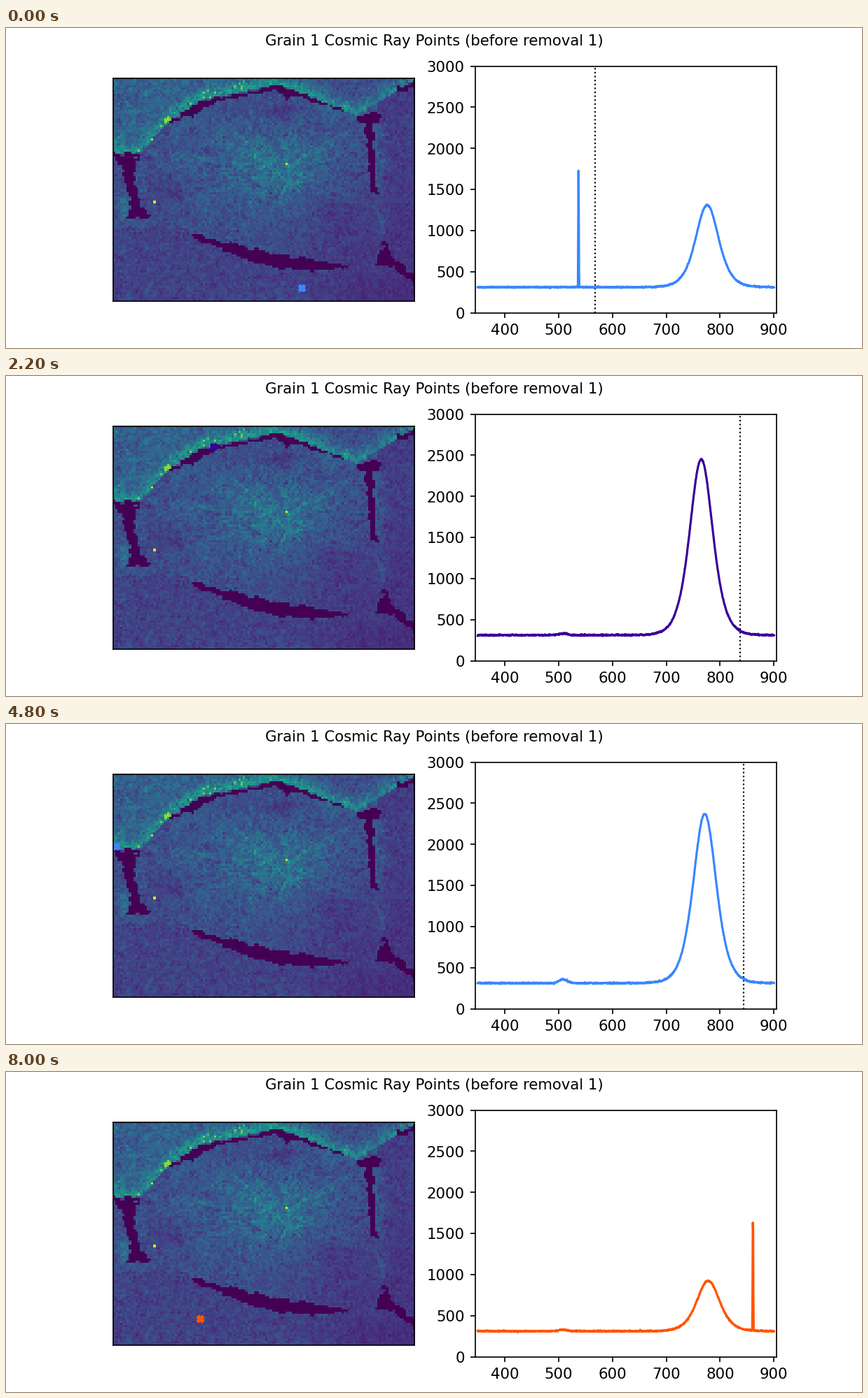
These frames come from a looping animation (1222 by 458 pixels, 8.2 s). A matplotlib script:

```python
import numpy as np
import matplotlib.pyplot as plt
from matplotlib.animation import FuncAnimation

FRAMES, INTERVAL = 41, 200
COLORS = ["#3a86ff", "#ffbe0b", "#ff006e", "#8338ec", "#ff5400", "#390099"]

# map grid, placed in stage pixels
COLS, ROWS = 135, 100
CELL = 430.6 / COLS
LEFT, TOP = 152.8, 71.6
RIGHT, BOTTOM = LEFT + CELL * COLS, TOP + CELL * ROWS

rng = np.random.default_rng(7)


# ---- grain map ----
def sigmoid(v):
    return 1 / (1 + np.exp(-v))


def bump(v, center, width):
    return np.exp(-((v - center) / width) ** 2)


def soft_noise(size):
    """Unit noise smoothed over a few cells."""
    kernel = np.hanning(size + 2)
    field = rng.normal(size=(ROWS, COLS))
    for axis in (0, 1):
        field = np.apply_along_axis(np.convolve, axis, field, kernel, "same")
    return field / field.std()


def rim(x):
    """Upper border of the main grain."""
    return np.interp(x, [153, 192, 230, 280, 388, 500, 583],
                     [180, 178, 136, 103, 80, 125, 74])


def floor(x):
    """Lower border of the main grain."""
    u = (x - 262) / 228
    return 293 + 105 * u - 58 * u ** 2


def voids(x, y):
    v = (y - 180) / 92
    left = (abs(y - 226) < 46) & (
        abs(x - 172 - 19 * np.clip(v, 0, 1) ** 1.5)
        < 6 + 14 * abs(2 * v - 1) ** 3)

    thick = 6 + 9 * bump(x, 270, 20) + 13 * bump(x, 399, 8)
    thick = thick * np.clip((x - 225) / 30, 0, 1) * np.clip((500 - x) / 70, 0, 1)
    arc = (y > rim(x)) & (y < rim(x) + thick)

    wall = (abs(y - 178) < 59) & (
        abs(x - 516 - 0.09 * (y - 127) - np.clip(129 - y, 0, 12))
        < 4.5 + 13 * bump(y, 129, 7))

    taper = np.sin(np.pi * np.clip((x - 262) / 228, 0, 1))
    crack = abs(y - floor(x)) < 9.5 * taper ** 0.7

    wedge = (abs(y - 322.5) < 18.5) & (abs(x - 541) < 0.42 * (y - 302))
    wedge |= (x > 545) & (abs(y - 336 - 0.78 * (x - 552)) < 6)
    notch = (x > 559) & (abs(y - 89 + 0.3 * (x - 559)) < 4)
    return left | arc | wall | crack | wedge | notch


def grain_map():
    x, y = np.meshgrid(LEFT + CELL * (np.arange(COLS) + 0.5),
                       TOP + CELL * (np.arange(ROWS) + 0.5))

    # main grain: bright core with rays
    angle = np.arctan2(y - 200, x - 392)
    rays = np.interp(angle, np.linspace(-np.pi, np.pi, 120),
                     rng.normal(size=120))
    val = 0.235 + 0.13 * bump(x, 392, 65) * bump(y, 200, 50)
    val += 0.05 * bump(x, 300, 90) * bump(y, 185, 65)
    val += 0.03 * rays * bump(x, 370, 130) * bump(y, 195, 75)
    val -= 0.06 * bump(x, 388, 18) * bump(y, 118, 14)
    val -= 0.05 * bump(x, 225, 28) * bump(y, 235, 28)
    val -= 0.07 * sigmoid((x - 430) / 20) * sigmoid((y - 235) / 18)

    # right and lower neighbours
    val = np.where(x > 530, 0.18 - 0.03 * sigmoid((y - 230) / 20), val)
    val += 0.07 * bump(x, 535, 8) * (abs(y - 215) < 80)
    low = np.where(x < 262, 284, floor(np.minimum(x, 500)))
    under = 0.2 - 0.08 * sigmoid((x - 470) / 25) * sigmoid((y - 345) / 10)
    val = np.where(y > low, under, val)

    # upper neighbour with its bright border
    d = rim(x) - y
    above = 0.31 - 0.07 * sigmoid((x - 430) / 25) + 0.2 * bump(d, 4, 12)
    val = np.where(d > 0, above, val)
    val += 0.07 * np.exp(-abs(d) / 14) * (d < 0) * bump(x, 470, 40)

    # border of the left void
    val += 0.17 * bump(x, 168, 6) * bump(y, 258, 16)

    # grain of the measurement, stronger where it is brighter
    noise = rng.normal(size=x.shape) + 0.5 * soft_noise(2)
    val *= 1 + 0.15 * noise + 0.05 * soft_noise(5)
    val += 0.15 * ((abs(d - 7) < 7) & (x < 340) & (noise > 1.6))

    val[voids(x + 1.5 * soft_noise(3), y + 1.5 * soft_noise(3))] = 0
    for cx, cy in ((211, 248), (400, 195)):
        val[int((cy - TOP) / CELL), int((cx - LEFT) / CELL)] = 0.96
    return np.clip(val, 0, 1)


# ---- spectra ----
wave = np.linspace(350, 900, 1024)


def spectrum(center, height, extra=0, spike=None):
    s = 312 + height / np.cosh((wave - center) / 28.4) ** 2
    s += extra * bump(wave, 509, 11) + rng.normal(0, 4, wave.size)
    if spike:
        at, top = spike
        s += (top - 312) * np.clip(1 - abs(wave - at) / 1.1, 0, 1)
    return s


# marker position and spectrum of each map point
POINTS = {
    "first": ((421.5, 371.5), spectrum(776, 1000, spike=(537.2, 1870))),
    "arc": ((295.5, 101.3), spectrum(765, 2140, 20)),
    "rim": ((157.3, 175), spectrum(771.5, 2060, 45)),
    "corner": ((188, 177.5), spectrum(770, 2950, 28)),
    "last": ((277.3, 353), spectrum(778, 612, 18, spike=(861, 2000))),
}


def point_at(i):
    if i == 0:
        return "first"
    if i == FRAMES - 1:
        return "last"
    if i < 19:
        return "arc" if i % 2 else "rim"
    return "corner" if i % 3 else "rim"


def cursor_at(i):
    return 831.7 + 0.515 * i if i else 568.4


# ---- figure ----
fig, (ax_map, ax) = plt.subplots(1, 2, figsize=(8, 3), dpi=152.8)
fig.suptitle("Grain 1 Cosmic Ray Points (before removal 1)", fontsize=10)

ax_map.imshow(grain_map(), cmap="viridis", vmin=0, vmax=1,
              interpolation="nearest", extent=(LEFT, RIGHT, BOTTOM, TOP))
marker = ax_map.scatter([LEFT], [TOP], s=20, marker="X", zorder=2)
ax_map.set(xticks=[], yticks=[], xlim=(LEFT, RIGHT), ylim=(BOTTOM, TOP))

cursor = ax.axvline(0, color="k", ls=":", lw=1, zorder=1)
curve, = ax.plot(wave, wave, lw=1.5)
ax.set(xlim=(345, 905), ylim=(0, 3000), xticks=range(400, 901, 100),
       yticks=range(0, 3001, 500))


def update(i):
    pos, counts = POINTS[point_at(i)]
    color = COLORS[i % len(COLORS)]
    marker.set_offsets([pos])
    marker.set_color(color)
    curve.set_ydata(counts)
    curve.set_color(color)
    cursor.set_xdata([cursor_at(i)] * 2)
    cursor.set_visible(i < FRAMES - 1)
    return marker, curve, cursor


anim = FuncAnimation(fig, update, frames=FRAMES, interval=INTERVAL,
                     repeat=True, repeat_delay=0)
plt.show()
```
